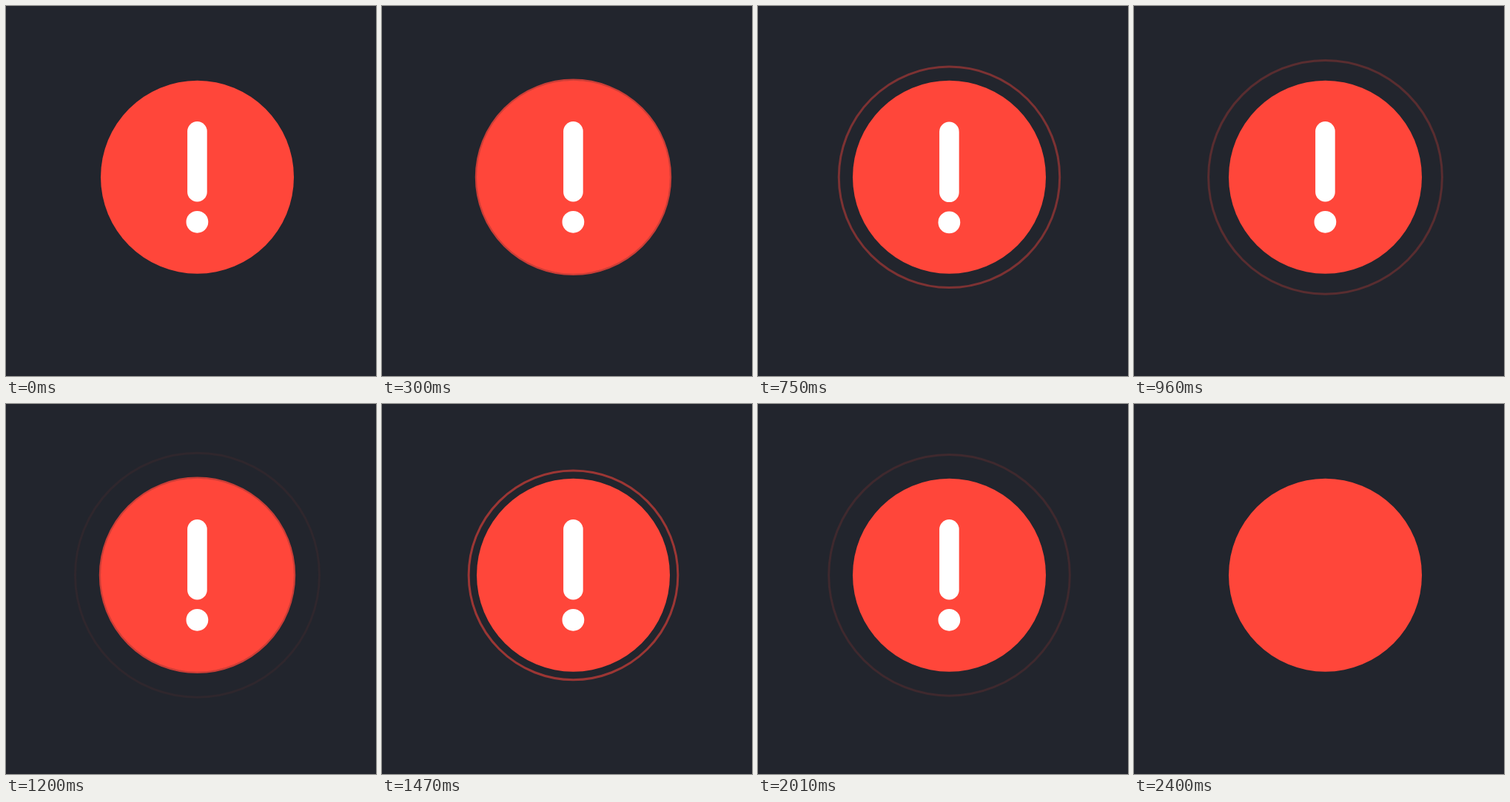
These frames come from a looping animation (500x500 px, 2.43 s). An HTML page:

```html
<!DOCTYPE html>
<html lang="en">
<head>
<meta charset="utf-8">
<title>Alert pulse</title>
<style>
  html, body { margin: 0; width: 100%; height: 100%; overflow: hidden; background: #22252d; }
  svg { display: block; width: 100%; height: 100%; }
</style>
</head>
<body>
<svg viewBox="0 0 500 500">
  <rect width="500" height="500" fill="#22252d"/>
  <g fill="none" stroke="#ff463a" stroke-width="3">
    <circle class="ring" cx="258.5" cy="231.3" r="126"/>
    <circle class="ring" cx="258.5" cy="231.3" r="126"/>
  </g>
  <circle cx="258.5" cy="231.3" r="130.5" fill="#ff463a"/>
  <g id="mark" fill="#fff">
    <rect x="245.1" y="156" width="26.6" height="108.5" rx="13.3"/>
    <circle cx="258.4" cy="291.8" r="14.9"/>
  </g>
</svg>
<script>
  const LOOP = 2430, STEP = 30;
  const RING_GAP = 900, GROW = 1380, FADE = 1275;
  const rings = document.querySelectorAll('.ring');
  const mark = document.getElementById('mark');

  const clamp = x => Math.min(1, Math.max(0, x));
  const span = (t, a, b) => clamp((t - a) / (b - a));
  const smooth = x => x * x * (3 - 2 * x);

  function drawRing(ring, t) {
    const alpha = t < 0 ? 0 : 1 - span(t, 0, FADE);
    ring.setAttribute('r', 126.3 + 40.6 * smooth(span(t, 0, GROW)));
    ring.setAttribute('opacity', alpha);
  }

  function draw(t) {
    rings.forEach((ring, i) => drawRing(ring, t - i * RING_GAP));
    const dip = 0.6 * Math.sin(Math.PI * span(t, 570, 930));
    mark.setAttribute('transform', `translate(0 ${dip})`);
    mark.setAttribute('opacity', 1 - smooth(span(t, 2160, 2400)));
  }

  const start = performance.now();
  function tick() {
    const t = (performance.now() - start) % LOOP;
    draw(Math.floor(t / STEP) * STEP);
    requestAnimationFrame(tick);
  }
  draw(0);
  requestAnimationFrame(tick);
</script>
</body>
</html>
```
